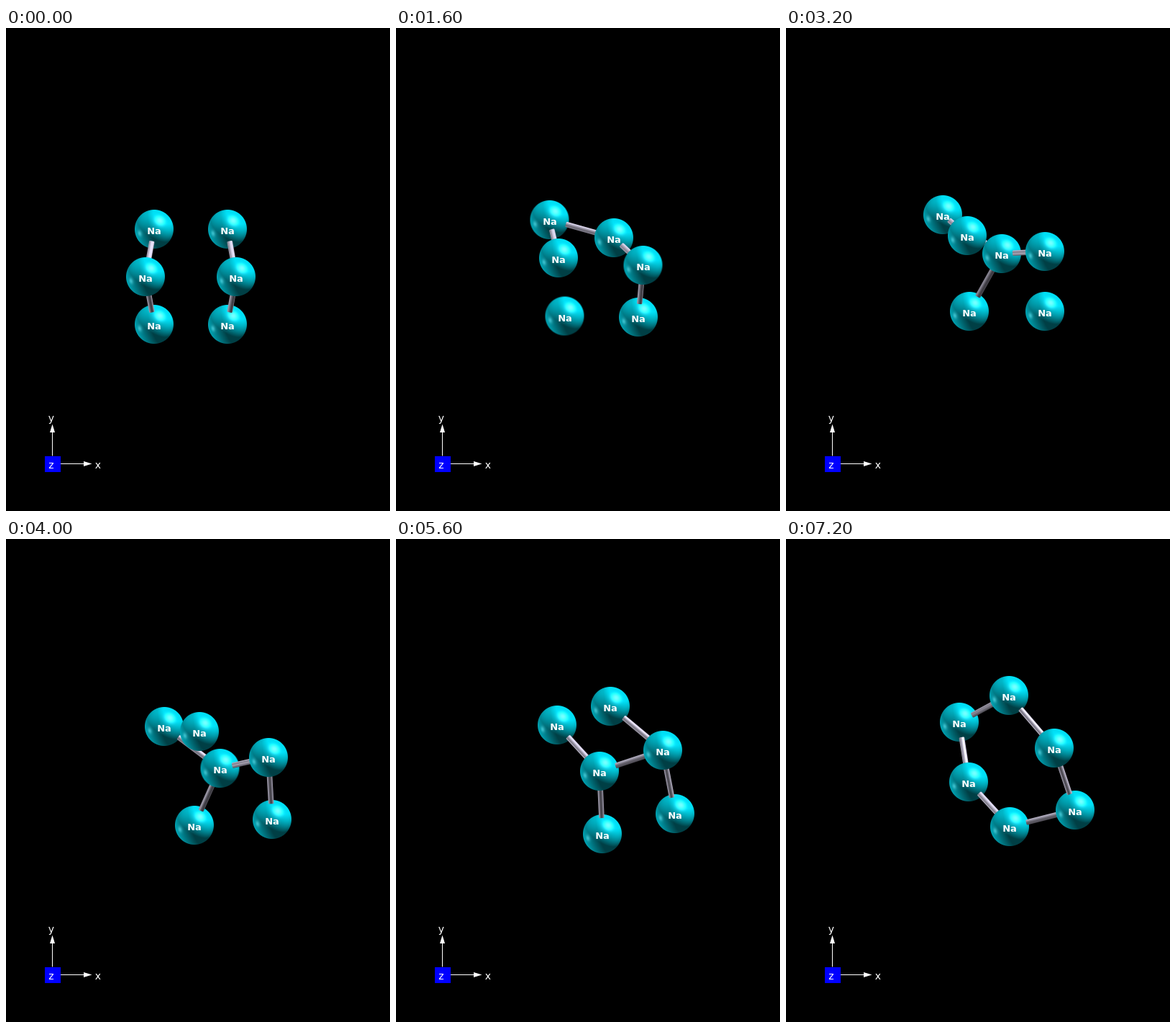
Write an HTML page with a canvas that moves like this. It is 534x670 px and loops after 8 s.

```html
<!DOCTYPE html>
<html lang="en">
<head>
<meta charset="utf-8">
<title>Sodium cluster</title>
<style>
html, body { margin: 0; width: 100%; height: 100%; overflow: hidden; background: #000; }
canvas { display: block; }
</style>
</head>
<body>
<canvas id="stage" width="534" height="670"></canvas>
<script>
const ctx = document.getElementById('stage').getContext('2d');
const STEP = 800, RADIUS = 27, BOND_LENGTH = 105, BOND_RADIUS = 3.8;
const ATOM_COLOR = [0, 224, 246], BOND_COLOR = [222, 216, 240];

// Each pose: x, y of atoms A to F; drawing order; bonds from far to near atom.
const pose = (points, order, bonds) => ({ points, order, bonds: bonds.split(' ') });
const POSES = [
  pose([206,279, 308,279, 194,345, 320,345, 206,411, 308,411], 'ABEFCD', 'AC BD EC FD'),
  pose([211,273, 305,284, 211,331, 331.5,337, 221,405, 323.5,406], 'ABEFCD', 'AB AC BD EC FD'),
  pose([213.5,266, 303,291, 226,319, 343.5,329, 234.5,399.5, 337,401], 'ABEFCD', 'AB AC BD FD'),
  pose([215,262, 301.5,301, 239,304, 353,320, 245,396, 349,397], 'ABEFCD', 'AB AC BD'),
  pose([218,259, 300,313, 252,288, 360,310, 255,393, 360,393], 'ACEBFD', 'AB AC EB BD'),
  pose([220,260, 297.5,318, 269,267, 365,303, 262,397, 370,389], 'ACEBFD', 'AB EB BD FD'),
  pose([222,260, 293,321, 285,246, 369,297, 272,405, 379,385], 'ACEBFD', 'AB EB BD FD'),
  pose([224,258, 283,322, 298,232, 371,293, 287,409, 388,381], 'ACEBFD', 'AB EB BD FD CD'),
  pose([231,256, 269,328, 304,223, 372,291, 301,407, 396,378], 'ACBEFD', 'AB AC BE FD CD'),
  pose([241,254, 254,337, 310,217, 373,290, 311,399, 402,376], 'ACBEFD', 'AB AC BE EF FD CD')
];

const dot = (a, b) => a[0] * b[0] + a[1] * b[1] + a[2] * b[2];
const LIGHTS = [
  { dir: [.51, -.75, .44], half: [.3, -.44, .85], diffuse: .85, gloss: .42, power: 32 },
  { dir: [-.93, .28, -.2], half: [-.74, .22, .63], diffuse: .5, gloss: .3, power: 80 }
];

function shade(color, normal) {
  let light = .28, gloss = 0;
  for (const l of LIGHTS) {
    light += l.diffuse * Math.max(0, dot(normal, l.dir));
    gloss += l.gloss * Math.max(0, dot(normal, l.half)) ** l.power;
  }
  return color.map(c => Math.min(255, c * Math.min(1, light) + 255 * gloss));
}

function makeSphere() {
  const size = 2 * RADIUS + 2, canvas = document.createElement('canvas');
  canvas.width = canvas.height = size;
  const g = canvas.getContext('2d'), image = g.createImageData(size, size);
  for (let i = 0; i < size * size; i++) {
    const x = i % size + .5 - size / 2, y = Math.floor(i / size) + .5 - size / 2;
    const d = Math.hypot(x, y), k = Math.max(RADIUS, d);
    const normal = [x / k, y / k, Math.sqrt(Math.max(0, 1 - (d / k) ** 2))];
    const alpha = Math.max(0, Math.min(1, RADIUS + .5 - d));
    image.data.set([...shade(ATOM_COLOR, normal), 255 * alpha], i * 4);
  }
  g.putImageData(image, 0, 0);
  return canvas;
}
const sphere = makeSphere();

function text(str, x, y, font) {
  ctx.font = font;
  ctx.fillStyle = '#fff';
  ctx.textAlign = 'center';
  ctx.fillText(str, x, y);
}

function drawAtom([x, y]) {
  ctx.drawImage(sphere, x - RADIUS - 1, y - RADIUS - 1);
  text('Na', Math.round(x), Math.round(y) + 7, 'bold 13px "DejaVu Sans", sans-serif');
}

function drawBond([x0, y0], [x1, y1]) {
  const dx = x1 - x0, dy = y1 - y0, d = Math.hypot(dx, dy);
  const flat = Math.min(.99, d / BOND_LENGTH), depth = Math.sqrt(1 - flat * flat);
  const front = [-dx / d * depth, -dy / d * depth, flat], side = [-dy / d, dx / d, 0];
  const fill = ctx.createLinearGradient(0, -BOND_RADIUS, 0, BOND_RADIUS);
  for (let i = 0; i <= 8; i++) {
    const s = i / 4 - 1, c = Math.sqrt(1 - s * s);
    const rgb = shade(BOND_COLOR, front.map((f, k) => f * c + side[k] * s));
    fill.addColorStop(i / 8, `rgb(${rgb.map(Math.round)})`);
  }
  const start = RADIUS * flat - .5;
  ctx.save();
  ctx.translate(x0, y0);
  ctx.rotate(Math.atan2(dy, dx));
  ctx.fillStyle = fill;
  ctx.beginPath();
  ctx.roundRect(start, -BOND_RADIUS, d - start, 2 * BOND_RADIUS, 1.5);
  ctx.fill();
  ctx.restore();
}

function arrow(x, y, angle) {
  ctx.save();
  ctx.translate(x, y);
  ctx.rotate(angle);
  ctx.fillStyle = '#fff';
  ctx.fillRect(11, -.5, 38, 1);
  ctx.beginPath();
  ctx.moveTo(55, 0);
  ctx.lineTo(43.5, -3.5);
  ctx.lineTo(43.5, 3.5);
  ctx.fill();
  ctx.restore();
}

function drawAxes() {
  const font = '14px "DejaVu Sans", sans-serif';
  arrow(64.5, 604.5, 0);
  arrow(64.5, 604.5, -Math.PI / 2);
  ctx.fillStyle = '#00f';
  ctx.fillRect(54, 594, 22, 22);
  text('x', 128, 611, font);
  text('y', 63, 546, font);
  text('z', 63, 611, font);
}

function draw({ points, order, bonds }) {
  const at = name => {
    const i = 2 * 'ABCDEF'.indexOf(name);
    return [points[i], points[i + 1]];
  };
  ctx.fillStyle = '#000';
  ctx.fillRect(0, 0, 534, 670);
  drawAxes();
  for (const atom of order) {
    drawAtom(at(atom));
    for (const [far, near] of bonds) if (far === atom) drawBond(at(far), at(near));
  }
}

function tick() {
  draw(POSES[Math.floor(performance.now() / STEP) % POSES.length]);
  requestAnimationFrame(tick);
}
tick();
</script>
</body>
</html>
```
